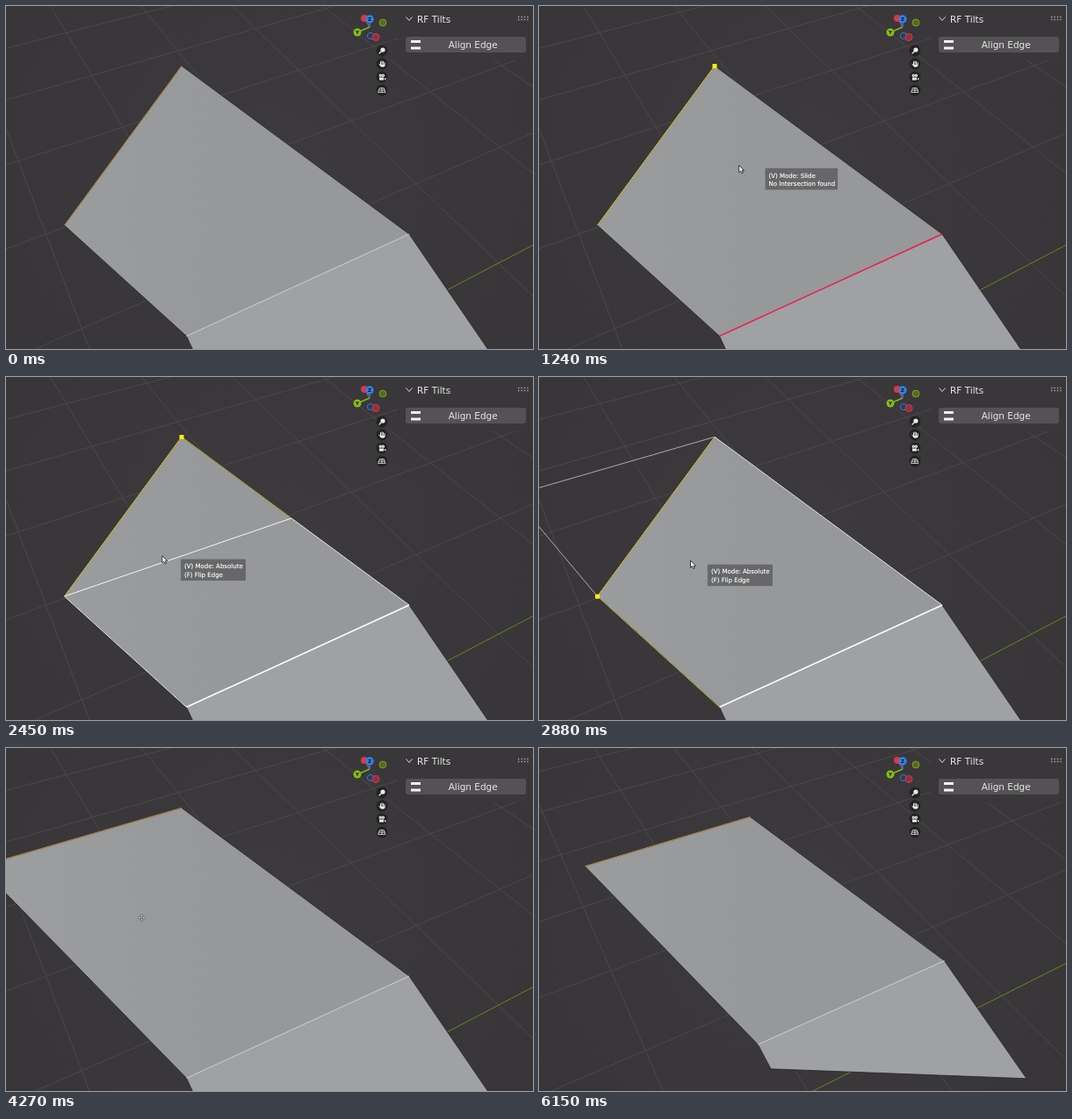
Animation of 600 by 391 pixels, one loop 6.18 s. Source, as an HTML page:

```html
<!DOCTYPE html>
<html lang="en">
<head>
<meta charset="utf-8">
<title>Edge alignment</title>
<style>
  html, body { margin: 0; width: 100%; height: 100%; overflow: hidden; background: #393739; }
  svg { display: block; width: 100%; height: 100%; }
  text { font-family: "DejaVu Sans", Verdana, sans-serif; fill: #e8e8e8; }
  .ui { font-size: 10.5px; }
  #tip text { font-size: 7px; fill: #fff; stroke: #fff; stroke-width: .15; }
  .line { fill: none; stroke-width: 1; }
  .axis text { font-size: 5.5px; font-weight: bold; fill: #111; text-anchor: middle; }
  .tool { fill: none; stroke: #eee; stroke-width: 1.2; stroke-linecap: round; }
</style>
</head>
<body>
<svg viewBox="0 0 600 391">
  <defs>
    <radialGradient id="bg" gradientUnits="userSpaceOnUse" cx="300" cy="180" r="380">
      <stop offset="0" stop-color="#3c3a3c"/><stop offset="1" stop-color="#373537"/>
    </radialGradient>
    <linearGradient id="shade" gradientUnits="userSpaceOnUse" x1="0" y1="0" x2="260" y2="0">
      <stop offset="0" stop-color="#9c9d9f"/><stop offset="1" stop-color="#97989a"/>
    </linearGradient>
  </defs>
  <rect width="600" height="391" fill="url(#bg)"/>
  <path id="grid" class="line" stroke="#4a484a" stroke-width=".8"/>
  <path id="green" class="line" stroke="#6b841c"/>

  <path id="lower" fill="#a0a1a4"/>
  <path id="upper" fill="url(#shade)"/>
  <path id="outline" class="line" stroke="#262526" style="stroke-width:.8" stroke-linejoin="round"/>
  <path id="seam" class="line"/>
  <path id="extension" class="line" stroke="#c9c8c9" style="stroke-width:.8"/>
  <path id="preview" class="line" stroke="#f4f6f4"/>
  <path id="slide" class="line" stroke="#b5b035"/>
  <path id="edge" class="line"/>
  <rect id="vertex" width="5" height="5" fill="#ffee00"/>

  <g id="tip">
    <rect height="24.5" fill="#000" fill-opacity=".32"/>
    <text x="4" y="10.8"></text>
    <text x="4" y="20.3"></text>
  </g>

  <g class="axis">
    <circle cx="408" cy="14" r="4" fill="#d8394b"/>
    <path d="M414 24L408 14" stroke="#d8394b" stroke-width="1.4"/>
    <circle cx="415" cy="34" r="3.6" fill="#2b3c5c" stroke="#3b77c4"/>
    <circle cx="421" cy="35.5" r="4" fill="#8b3340" stroke="#d8394b"/>
    <circle cx="429" cy="19" r="3.9" fill="#56691f" stroke="#7da51c"/>
    <path d="M414 24L400 30" stroke="#7fb81a" stroke-width="1.4"/>
    <path d="M414 24V15" stroke="#2f83e3" stroke-width="1.4"/>
    <circle cx="414" cy="15" r="4.7" fill="#2f83e3"/>
    <circle cx="400" cy="30" r="4.5" fill="#86bd15"/>
    <text x="414" y="17">Z</text>
    <text x="400" y="32">Y</text>
  </g>

  <g fill="#232223">
    <circle cx="428" cy="51" r="6.4"/><circle cx="428" cy="66" r="6.4"/>
    <circle cx="428" cy="81" r="6.4"/><circle cx="428" cy="96" r="6.4"/>
  </g>
  <g class="tool">
    <circle cx="429" cy="50" r="2" fill="#eee"/>
    <path d="M427.3 51.8L425 54"/>
    <path d="M426.5 67V63.6M428 67V62.8M429.6 67V63.4M431.2 67V64.6M425 66.2L427 69H430.5L431.2 67" stroke-width="1"/>
    <path d="M426 67H431V69H427Z" fill="#eee" stroke="none"/>
    <path d="M425 81.5H430V84.5H425ZM430.3 83L432.4 81.7V84.7Z" fill="#eee" stroke="none"/>
    <circle cx="426.3" cy="79.3" r="1.1"/><circle cx="429.4" cy="79.3" r="1.1"/>
    <path d="M425.8 93.6H430.2L432 98.4H424ZM425 96H431M428 93.6V98.4" stroke-width=".8"/>
  </g>

  <rect x="446" width="154" height="62" fill="#393739"/>
  <path d="M455.5 12.5L459 16.5L462.5 12.5" class="line" stroke="#ddd"/>
  <text class="ui" x="468" y="18.5">RF Tilts</text>
  <path d="M583 12.5H595M583 15.5H595" class="line" stroke="#aaa" style="stroke-width:1.4" stroke-dasharray="1.4 2"/>
  <rect id="button" x="455" y="35" width="137" height="18" rx="3"/>
  <path d="M461 39H472V42H461ZM461 46.5H472V49.5H461Z" fill="#f2f2f2"/>
  <text class="ui" x="531.7" y="47.5" text-anchor="middle">Align Edge</text>

  <path id="arrow" d="M0 0V8L1.9 6.4L3.2 9.2L4.6 8.5L3.4 5.9H5.9Z" fill="#fff" stroke="#111" stroke-width=".8"/>
  <g id="cross" class="line">
    <path d="M-4 0H-1.2M1.2 0H4M0 -4V-1.2M0 1.2V4" stroke="#444" style="stroke-width:2.2"/>
    <path d="M-3.6 0H-1.5M1.5 0H3.6M0 -3.6V-1.5M0 1.5V3.6" stroke="#eee" style="stroke-width:.9"/>
  </g>
</svg>
<script>
const LOOP = 6180;
const CLICK = 400, ABSOLUTE = 1900, FLIP = 2700, CONFIRM = 4000;
const ZOOM_START = 4400, ZOOM_END = 4860, CURSOR_GONE = 5600;
const LAG = 32;
const HORIZON = -472, VP_RIGHT = 2020, VP_LEFT = -231;

// Each corner: near view x, y, then far view x, y.
const corners = {
  top: [200, 68.3, 240.5, 78.5],
  right: [459, 260, 461.5, 242.5],
  seamLeft: [205.5, 376.3, 249.3, 338],
  aligned: [-30, 135, 52.3, 134.8],
  baseRight: [575, 430, 555, 376.8],
  baseLeft: [222, 412, 264, 365.8]
};
const OLD_LEFT = [66.5, 250], ON_RIGHT_EDGE = [325, 161];

// Cursor waypoints: time, x, y.
const route = [
  [60, 640, 100], [300, 534, 46], [420, 530, 45], [850, 319, 152.5],
  [1100, 270, 175], [1400, 175, 180], [1720, 70, 132], [1820, 106, 127.5],
  [1960, 185, 132], [2200, 190, 190], [2500, 176, 205], [2820, 172.5, 209],
  [2940, 172.5, 209], [3300, 168, 205], [3950, 158, 196], [4270, 154.5, 193.5],
  [4400, 154.5, 193.5], [4840, 208, 191.5], [4940, 209.5, 191.5], [5600, 209.5, 191.5]
];

const el = {};
document.querySelectorAll('[id]').forEach(node => el[node.id] = node);
const [tipBox, tipTop, tipBottom] = el.tip.children;

const mix = (a, b, p) => a + (b - a) * p;
const show = (node, on) => node.setAttribute('visibility', on ? 'visible' : 'hidden');
const move = (node, x, y) => node.setAttribute('transform', `translate(${x} ${y})`);
const path = (node, points, closed) =>
  node.setAttribute('d', 'M' + points.map(q => q.join(' ')).join('L') + (closed ? 'Z' : ''));
const stroke = (node, color, width) => {
  node.style.stroke = color;
  node.style.strokeWidth = width;
};

function slope(i, axis) {
  const a = route[Math.max(i - 1, 0)], b = route[Math.min(i + 1, route.length - 1)];
  return (b[axis] - a[axis]) / (b[0] - a[0]);
}

// Cubic Hermite curve through the waypoints.
function cursorAt(t) {
  t = Math.min(Math.max(t, route[0][0]), route.at(-1)[0]);
  let i = 0;
  while (i < route.length - 2 && t > route[i + 1][0]) i++;
  const a = route[i], b = route[i + 1], span = b[0] - a[0], u = (t - a[0]) / span;
  return [1, 2].map(k =>
    mix(a[k], b[k], u * u * (3 - 2 * u)) +
    span * u * (1 - u) * ((1 - u) * slope(i, k) - u * slope(i + 1, k)));
}

// A floor line crosses the bottom of the stage at x and heads for a vanishing point.
const floorLine = (x, vp) => {
  const at = p => `${mix(x, vp, p)} ${mix(391, HORIZON, p)}`;
  return `M${at(-1)}L${at(0.9)}`;
};

function drawFloor(p) {
  const axis = mix(374, 312, p), stepA = mix(341, 298, p);
  const first = mix(95, 141, p), stepB = mix(189, 165, p);
  let d = '';
  for (let i = -11; i <= 4; i++) if (i) d += floorLine(axis + i * stepA, VP_RIGHT);
  for (let i = -2; i <= 9; i++) d += floorLine(first + i * stepB, VP_LEFT);
  el.grid.setAttribute('d', d);
  el.green.setAttribute('d', floorLine(axis, VP_RIGHT));
}

function drawMesh(t, p) {
  const c = {};
  for (const [name, [ax, ay, bx, by]] of Object.entries(corners))
    c[name] = [mix(ax, bx, p), mix(ay, by, p)];
  const left = t < CONFIRM ? OLD_LEFT : c.aligned;
  const tool = t >= CLICK && t < CONFIRM;
  const absolute = t >= ABSOLUTE && t < CONFIRM;
  const flipped = t >= FLIP;

  path(el.upper, [c.top, c.right, c.seamLeft, left], true);
  path(el.lower, [c.seamLeft, c.right, c.baseRight, c.baseLeft], true);
  path(el.outline, [c.seamLeft, left, c.top, c.right, c.baseRight, c.baseLeft], true);
  path(el.seam, [c.seamLeft, c.right]);
  path(el.edge, [c.top, left]);
  stroke(el.edge, tool ? '#e2d62c' : '#c28d42', 1);
  if (absolute) stroke(el.seam, '#fbfffb', 1.6);
  else if (tool) stroke(el.seam, '#ee1c4a', 1.4);
  else stroke(el.seam, '#d2d2d2', 1);

  show(el.preview, absolute);
  show(el.slide, absolute);
  show(el.extension, absolute && flipped);
  path(el.extension, [left, c.aligned, c.top]);
  if (flipped) {
    path(el.preview, [c.top, c.right]);
    path(el.slide, [left, c.seamLeft]);
  } else {
    path(el.preview, [c.seamLeft, left, ON_RIGHT_EDGE, c.right]);
    path(el.slide, [c.top, ON_RIGHT_EDGE]);
  }
  const active = flipped ? left : c.top;
  show(el.vertex, tool);
  move(el.vertex, active[0] - 2.5, active[1] - 2.3);
}

function drawPointer(t) {
  const [x, y] = cursorAt(t);
  show(el.arrow, t >= 60 && t < CONFIRM);
  show(el.cross, t >= CONFIRM && t < CURSOR_GONE);
  move(el.arrow, x, y);
  move(el.cross, x, y);

  const absolute = t >= ABSOLUTE;
  const [tx, ty] = cursorAt(t - LAG);
  show(el.tip, t >= CLICK && t < CONFIRM);
  move(el.tip, tx + 19.5, ty + 4.5);
  tipBox.setAttribute('width', absolute ? 74 : 82.5);
  tipTop.textContent = absolute ? '(V) Mode: Absolute' : '(V) Mode: Slide';
  tipBottom.textContent = absolute ? '(F) Flip Edge' : 'No Intersection found';
  el.button.setAttribute('fill', t > 250 && t < 520 ? '#646264' : '#545254');
}

function draw(now) {
  const t = now % LOOP;
  const u = Math.min(Math.max((t - ZOOM_START) / (ZOOM_END - ZOOM_START), 0), 1);
  const p = u * u * (3 - 2 * u);
  drawFloor(p);
  drawMesh(t, p);
  drawPointer(t);
}

const begin = performance.now();
function tick() {
  draw(performance.now() - begin);
  requestAnimationFrame(tick);
}
tick();
</script>
</body>
</html>
```
